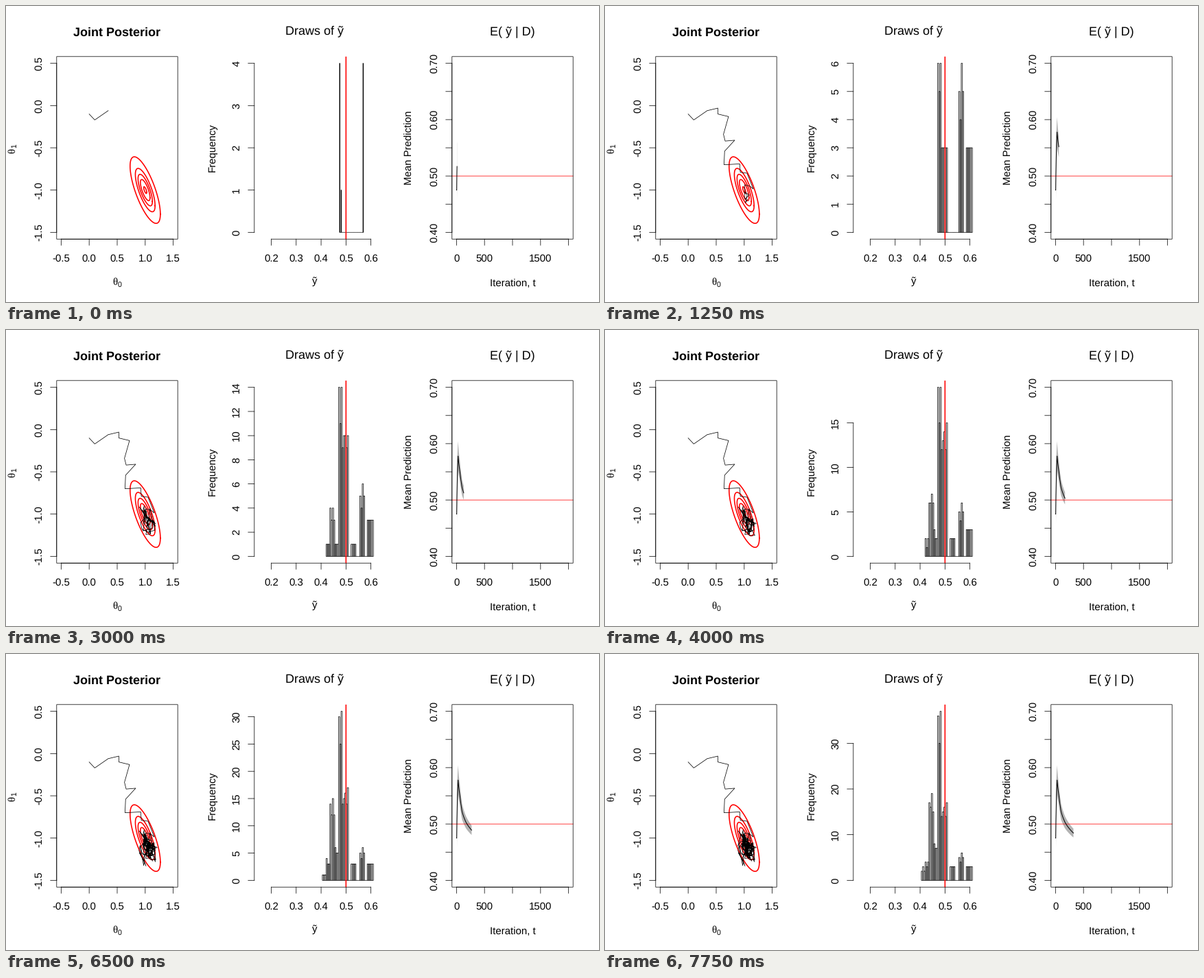
A matplotlib script that plays this animation: 864x432 px, repeating every 8000 ms.

```python
import numpy as np
import matplotlib.pyplot as plt
from matplotlib.animation import FuncAnimation
from matplotlib.collections import PolyCollection
from matplotlib.patches import Rectangle

plt.rcParams["font.family"] = ["Liberation Sans", "DejaVu Sans"]
plt.rcParams["text.hinting"] = "none"
plt.rcParams["path.snap"] = False

W, H, DPI = 864, 432, 72
FRAMES, INTERVAL, STEP = 32, 250, 10
THIN, THICK = 0.75, 1.6

# Panels are laid out in text lines, as margins around each third of the stage.
LINE = 18
PANEL = W / 3
LEFT = 4.1 * LINE
TOP = 4.1 * LINE
BOTTOM = H - 5.1 * LINE
BOX_W = PANEL - 6.2 * LINE
BOX_H = BOTTOM - TOP
TICK = LINE / 2

rng = np.random.RandomState(7)

# The stage is drawn in pixels, y pointing down.
fig = plt.figure(figsize=(W / DPI, H / DPI), dpi=DPI, facecolor="white")
ax = fig.add_axes([0, 0, 1, 1])
ax.set_xlim(0, W)
ax.set_ylim(H, 0)
ax.axis("off")


def line(xs, ys, color="black", lw=THIN, z=2, **kw):
    return ax.plot(xs, ys, color=color, lw=lw, zorder=z, **kw)[0]


def label(x, y, s, size=15, rot=0, ha="center", **kw):
    return ax.text(x, y, s, fontsize=size, rotation=rot, ha=ha,
                   va="baseline", rotation_mode="anchor", **kw)


class Panel:
    """A plot region that maps data to pixels with 4% padding."""

    def __init__(self, index, xlim, ylim):
        self.left = index * PANEL + LEFT
        self.mid = self.left + BOX_W / 2
        self.xlim, self.ylim = xlim, ylim

    def x(self, v):
        lo, hi = self.xlim
        return self.left + BOX_W * ((v - lo) / (hi - lo) + 0.04) / 1.08

    def y(self, v):
        lo, hi = self.ylim
        return BOTTOM - BOX_H * ((v - lo) / (hi - lo) + 0.04) / 1.08

    def region(self, **kw):
        return Rectangle((self.left, TOP), BOX_W, BOX_H, **kw)

    def frame(self):
        ax.add_patch(self.region(fill=False, ec="black", lw=THIN, zorder=4))

    def x_axis(self, values, fmt, hidden=()):
        xs = self.x(values)
        line([xs[0], xs[-1]], [BOTTOM] * 2)
        for x, v in zip(xs, values):
            line([x, x], [BOTTOM, BOTTOM + TICK])
            if v not in hidden:
                label(x, BOTTOM + 1.8 * LINE, fmt % v)

    def y_axis(self, values, fmt, every=1):
        ys = self.y(values)
        line([self.left] * 2, [ys[0], ys[-1]])
        for i, (y, v) in enumerate(zip(ys, values)):
            line([self.left - TICK, self.left], [y, y])
            if i % every == 0:
                label(self.left - 1.2 * LINE, y, fmt % v, rot=90)

    def y_title(self, s):
        label(self.left - 3.2 * LINE, (TOP + BOTTOM) / 2, s, rot=90)


# ---- Joint posterior -------------------------------------------------
joint = Panel(0, (-0.5, 1.5), (-1.5, 0.5))
joint.frame()
joint.x_axis(np.linspace(-0.5, 1.5, 5), "%.1f")
joint.y_axis(np.linspace(-1.5, 0.5, 5), "%.1f")
label(joint.mid, 43.4, "Joint Posterior", 18, weight="bold")
label(155, 407, "θ", ha="left", family="Liberation Serif")
label(162.6, 409.5, "0", 10.5, ha="left")
label(13, 215, "θ", rot=90, ha="left", family="Liberation Serif")
label(15.5, 207.4, "1", 10.5, rot=90, ha="left")

# Contours of a correlated Gaussian at evenly spaced density levels.
RHO = 0.72
angle = np.linspace(0, 2 * np.pi, 121)
u = np.cos(angle)
v = -RHO * u + np.sqrt(1 - RHO ** 2) * np.sin(angle)
for level in np.linspace(0.05, 0.97, 5):
    r = np.sqrt(np.log(level) / np.log(0.05))
    line(joint.x(1 + 0.27 * r * u), joint.y(-1 + 0.394 * r * v), "red", THICK)

DESCENT = [(0, -.1), (.1, -.17), (.34, -.06), (.53, -.03), (.53, -.1),
           (.72, -.13), (.63, -.34), (.66, -.42), (.83, -.41), (.65, -.54),
           (.64, -.7), (.92, -.69), (.93, -.79), (1.05, -.8)]


def walk(points, total):
    """Follow the descent, then wander inside the posterior, drifting down."""
    points = [np.array(p) for p in points]
    while len(points) < total:
        drift = min(1, len(points) / 80)
        centre = np.array([1.0 + 0.07 * drift, -0.95 - 0.22 * drift])
        a, b = rng.randn(2)
        step = np.array([0.075 * a, 0.085 * (b - 0.5 * a)])
        new = centre + 0.6 * (points[-1] - centre) + step
        if 0.88 < new[0] < 1.25 and new[1] > -1.41:
            points.append(new)
    return np.array(points)


def accepted(t):
    return 3 + int(0.4 * (t - STEP))


chain = walk(DESCENT, accepted(FRAMES * STEP))
chain_line = line([], [], z=3)

# ---- Histogram of draws ----------------------------------------------
hist = Panel(1, (0.15, 0.6), (0, 1))
hist.x_axis(np.linspace(0.2, 0.6, 5), "%.1f")
hist.y_title("Frequency")
label(hist.mid, 41.7, "Draws of ỹ", 18)
label(hist.mid, 406, "ỹ")
line([hist.x(0.5)] * 2, [TOP, BOTTOM], "red", THICK, z=4,
     solid_capstyle="butt")

# Regions visited by the chain: from, to, bar height, first and last iteration.
VISITS = [(0.405, 0.420, 2.5, 230, 320), (0.420, 0.435, 3.5, 90, 280),
          (0.435, 0.455, 17, 80, 320), (0.455, 0.470, 7, 90, 320),
          (0.470, 0.485, 33.5, 10, 320), (0.485, 0.510, 15, 30, 190),
          (0.520, 0.540, 3, 40, 240), (0.555, 0.575, 5, 5, 25),
          (0.585, 0.610, 3, 5, 25)]
FIRST, BIN = 0.405, 0.005

bars = PolyCollection([], facecolors="none", edgecolors="black",
                      linewidths=THIN, zorder=3)
ax.add_collection(bars, autolim=False)
bars.set_clip_path(hist.region(transform=ax.transData))

freq_axis = line([], [])
freq_ticks = [(line([], []), label(hist.left - 1.2 * LINE, 0, "", rot=90))
              for _ in range(9)]


def histogram(t):
    """Left edges, counts and bin width after t iterations."""
    if t <= STEP:  # only three states so far, hence finer bins
        edges = np.arange(0.474, 0.569, 0.002)
        counts = np.zeros(len(edges), int)
        counts[[0, 3, -1]] = 4, 1, 4
        return edges, counts, 0.002
    index = np.arange(42)
    edges = FIRST + BIN * index
    height = np.zeros(len(index))
    for lo, hi, peak, start, end in VISITS:
        inside = (edges > lo - BIN / 2) & (edges < hi - BIN / 2)
        height[inside] = peak * np.clip((t - start) / (end - start), 0, 1)
    ripple = 1 + 0.12 * np.sin(2.6 * index)
    counts = np.rint(height * ripple).astype(int)
    used = np.flatnonzero(counts)
    span = slice(used[0], used[-1] + 1)
    return edges[span], counts[span], BIN


def tick_step(top):
    """Round step that gives about five intervals."""
    cell = 1.08 * top / 5
    unit = 10 ** np.floor(np.log10(cell))
    c = cell / unit
    if 10 - c < 0.8 * (c - 5):
        k = 10
    elif 5 - c < 1.7 * (c - 2):
        k = 5
    elif 2 - c < 0.8 * (c - 1):
        k = 2
    else:
        k = 1
    return max(1, int(round(k * unit)))


def draw_histogram(t):
    edges, counts, width = histogram(t)
    top = counts.max()
    hist.ylim = (0, top)
    base = hist.y(0)
    verts = []
    for e, n in zip(edges, counts):
        a, b, y = hist.x(e), hist.x(e + width), hist.y(n)
        verts.append([(a, base), (a, y), (b, y), (b, base)])
    bars.set_verts(verts)

    values = range(0, top + 1, tick_step(top))
    freq_axis.set_data([hist.left] * 2, [base, hist.y(values[-1])])
    for i, (tick, name) in enumerate(freq_ticks):
        shown = i < len(values)
        tick.set_visible(shown)
        name.set_visible(shown)
        if shown:
            y = hist.y(values[i])
            tick.set_data([hist.left - TICK, hist.left], [y, y])
            name.set_y(y)
            name.set_text(str(values[i]))


# ---- Running mean ----------------------------------------------------
mean = Panel(2, (0, 2000), (0.4, 0.7))
mean.frame()
mean.x_axis(np.arange(0, 2001, 500), "%d", hidden=(1000, 2000))
mean.y_axis(np.linspace(0.4, 0.7, 7), "%.2f", every=2)
mean.y_title("Mean Prediction")
label(mean.mid, 41.7, "E( ỹ | D)", 18)
label(mean.mid, BOTTOM + 3.8 * LINE, "Iteration, t")
line([mean.left, mean.left + BOX_W], [mean.y(0.5)] * 2, "red", z=3)

MEAN_T = [4, 10, 28, 60, 100, 170, 320]
MEAN_V = [.475, .517, .578, .552, .522, .503, .484]

mean_line = line([], [], lw=1, z=3.5)
band = PolyCollection([], facecolors="#b3b3b3", edgecolors="none", zorder=2)
ax.add_collection(band, autolim=False)


def draw_mean(t):
    ts = np.arange(1, t + 1)
    m = np.interp(np.log(ts), np.log(MEAN_T), MEAN_V)
    mean_line.set_data(mean.x(ts), mean.y(m))
    ts, m = ts[7:], m[7:]
    half = 0.14 / np.sqrt(ts)
    upper = np.column_stack([mean.x(ts), mean.y(m + half)])
    lower = np.column_stack([mean.x(ts), mean.y(m - half)])
    band.set_verts([np.vstack([upper, lower[::-1]])])


def update(frame):
    t = STEP * (frame + 1)
    n = accepted(t)
    chain_line.set_data(joint.x(chain[:n, 0]), joint.y(chain[:n, 1]))
    draw_histogram(t)
    draw_mean(t)
    return []


anim = FuncAnimation(fig, update, frames=FRAMES, interval=INTERVAL,
                     repeat=True, repeat_delay=0, blit=False)
plt.show()
```
